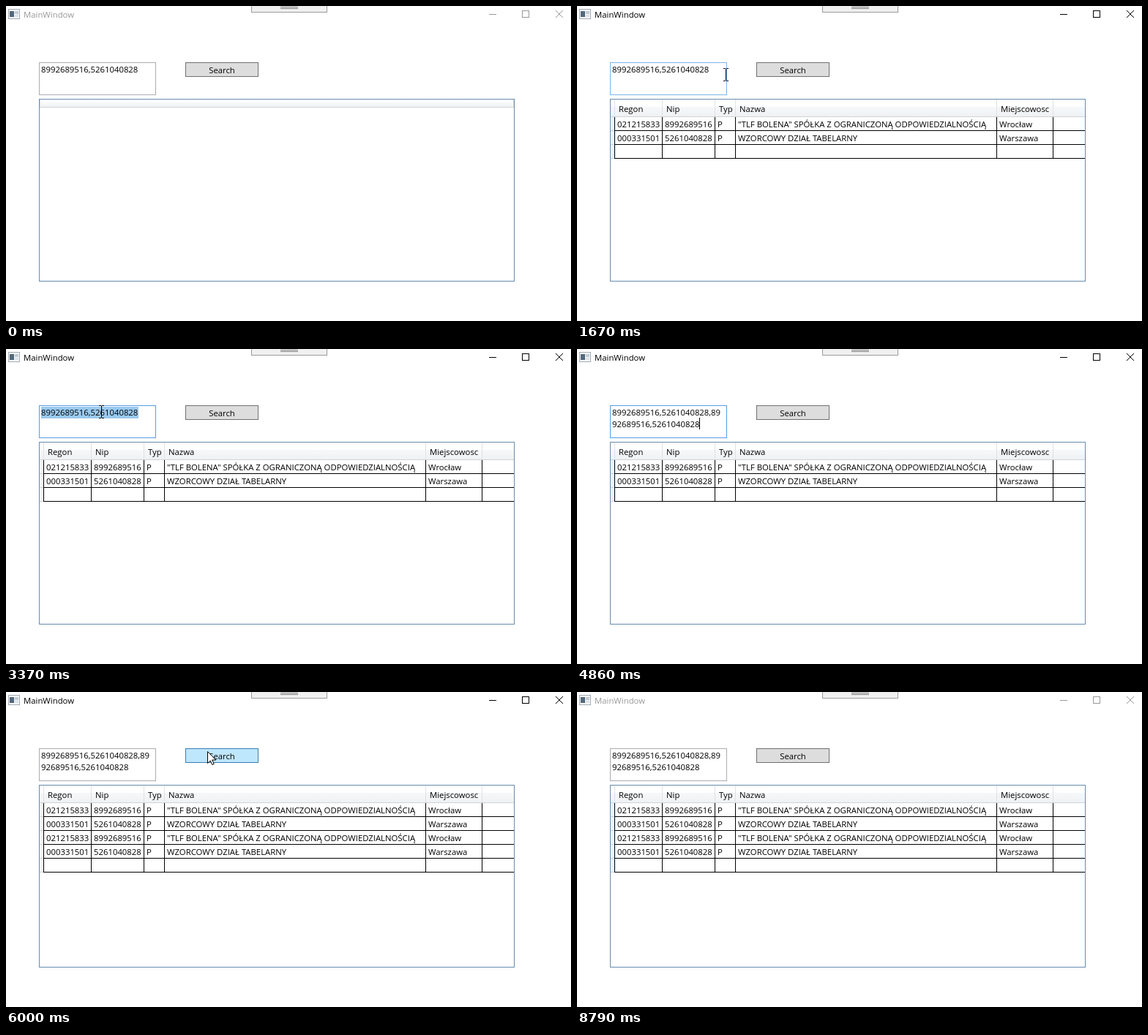
These frames come from a looping animation (772 px wide and 431 px high, 8870 ms). An HTML page:

```html
<!DOCTYPE html>
<html lang="pl">
<head>
<meta charset="utf-8">
<title>MainWindow</title>
<style>
  html, body { margin: 0; width: 100%; height: 100%; overflow: hidden; background: #fff; }
  svg { display: block; width: 100vw; height: 100vh; }
  text { font: 11.33px "Open Sans", "Noto Sans", sans-serif; white-space: pre; }
  rect, line { shape-rendering: crispEdges; }
</style>
</head>
<body>
<svg id="stage" viewBox="0 0 772 431">
  <defs>
    <linearGradient id="head" x1="0" y1="0" x2="0" y2="1">
      <stop offset="0" stop-color="#fff"/>
      <stop offset=".4" stop-color="#fff"/>
      <stop offset=".41" stop-color="#f7f8fa"/>
      <stop offset="1" stop-color="#f0f1f2"/>
    </linearGradient>
  </defs>
</svg>
<script>
const LOOP = 8870;
const stage = document.getElementById('stage');

function add(parent, tag, attrs, content) {
  const el = document.createElementNS('http://www.w3.org/2000/svg', tag);
  set(el, attrs);
  if (content) el.textContent = content;
  parent.appendChild(el);
  return el;
}
function set(el, attrs) {
  for (const k in attrs) el.setAttribute(k, attrs[k]);
}
const show = (el, on) => el.setAttribute('visibility', on ? 'visible' : 'hidden');
const group = (parent = stage) => add(parent, 'g', {});
const fill = (p, x, y, width, height, color) => add(p, 'rect', { x, y, width, height, fill: color });
const frame = (p, x, y, w, h, color, stroke) =>
  add(p, 'rect', { x: x + .5, y: y + .5, width: w - 1, height: h - 1, fill: color, stroke });
const label = (p, x, y, s) => add(p, 'text', { x, y }, s);

// Title bar
fill(stage, 0, 0, 772, 431, '#fff');
frame(stage, 3, 4, 16, 14, '#f4f6f8', '#a3abb3');
fill(stage, 5, 7, 6, 8, '#53697c');
fill(stage, 12, 7, 5, 4, '#c3ccd4');
fill(stage, 12, 12, 5, 3, '#dde2e7');
const title = label(stage, 24, 16, 'MainWindow');
const chrome = add(stage, 'g', { fill: 'none' });
add(chrome, 'line', { x1: 660, y1: 11.5, x2: 670, y2: 11.5 });
add(chrome, 'rect', { x: 705.5, y: 6.5, width: 9, height: 9 });
add(chrome, 'path', { d: 'M751 6l10 10M761 6l-10 10' });

// Docked tool tab
frame(stage, 335, -2, 104, 11, '#f0f0f0', '#9b9b9b');
fill(stage, 375, 1, 24, 1, '#808080');
fill(stage, 375, 3, 24, 1, '#808080');

// Text box
const box = frame(stage, 45, 77, 160, 45, '#fff', '#abadb3');
const selection = fill(stage, 48, 79, 0, 16, '#99c9ef');
const lines = [label(stage, 48, 91, ''), label(stage, 48, 107, '')];
const caret = fill(stage, 0, 0, 1, 16, '#000');

// Button
const button = frame(stage, 245, 77, 100, 20, '#ddd', '#707070');
set(label(stage, 295, 92, 'Search'), { 'text-anchor': 'middle' });

// Data grid
frame(stage, 45, 127, 650, 250, '#fff', '#688caf');
const emptyHead = group();
fill(emptyHead, 46, 128, 648, 11, 'url(#head)');
fill(emptyHead, 46, 138, 648, 1, '#d0d3d6');
fill(emptyHead, 46, 128, 1, 11, '#d9dbdd');
fill(emptyHead, 693, 128, 1, 11, '#d9dbdd');

const edges = [51, 116, 188, 216, 573, 650];
const names = ['Regon', 'Nip', 'Typ', 'Nazwa', 'Miejscowosc'];
const records = [
  ['021215833', '8992689516', 'P', '"TLF BOLENA" SPÓŁKA Z OGRANICZONĄ ODPOWIEDZIALNOŚCIĄ', 'Wrocław'],
  ['000331501', '5261040828', 'P', 'WZORCOWY DZIAŁ TABELARNY', 'Warszawa']
];

function makeTable(count) {
  const g = group();
  const bottom = 152 + (count + 1) * 19;
  fill(g, 46, 128, 648, 24, 'url(#head)');
  fill(g, 46, 151, 648, 1, '#d0d3d6');
  fill(g, 46, 152, 5, bottom - 152, '#f3f4f5');
  edges.forEach((x, i) => {
    fill(g, x, 128, 1, 23, '#dfe1e4');
    fill(g, x, 152, 1, bottom - 152, '#000');
    if (names[i]) label(g, x + 6, 145, names[i]);
  });
  for (let r = 0; r <= count; r++) {
    const y = 152 + r * 19;
    fill(g, 46, y + 18, 5, 1, '#d0d3d6');
    fill(g, 51, y + 18, 643, 1, '#000');
    if (r < count) records[r % 2].forEach((s, i) => label(g, edges[i] + 4, y + 14, s));
  }
  return g;
}
const shortTable = makeTable(2);
const longTable = makeTable(4);

// Pointer
const halo = add(stage, 'circle', { r: 12, fill: '#fff000', 'fill-opacity': .5 });
const arrow = add(stage, 'path', {
  d: 'M.5.5V16.5L4.2 13L6.8 18.5L9.2 17.5L6.7 12H11.8Z', fill: '#fff', stroke: '#000'
});
const beam = add(stage, 'path', {
  d: 'M-3 -8.5H0M1 -8.5H4M-3 8.5H0M1 8.5H4M.5 -8V8', fill: 'none', stroke: '#000'
});

// Bursts of motion: start, end, number of steps
const bursts = [
  [70, 520, 7], [1290, 1750, 7], [1980, 2590, 9], [2910, 3450, 8],
  [5320, 5620, 5], [6550, 7400, 12], [7470, 7780, 5]
];
// Pointer path: time, x, y
const path = [
  [70, 515, 318], [300, 366, 150], [520, 307, 89], [1290, 307, 89], [1750, 182, 95],
  [1980, 184, 94], [2355, 196, 86], [2400, 196, 86], [2500, 194, 84], [2900, 193, 88],
  [3140, -8, 90], [3220, -8, 90], [3450, 199, 84], [5320, 199, 93], [5440, 225, 98],
  [5620, 275, 81], [6500, 275, 81], [6700, 470, 260], [6860, 645, 398], [7020, 752, 160],
  [7095, 750, 1], [7165, 726, 25], [7400, 727, 300], [7470, 732, 318], [7770, 775, 434]
];

function stepTime(t) {
  let held = t;
  for (const [a, b, n] of bursts) {
    if (t < a) break;
    const step = (b - a) / (n - 1);
    held = a + Math.min(n - 1, Math.floor((t - a + 6) / step)) * step;
  }
  return held;
}

function pointerAt(t) {
  const s = stepTime(t);
  const i = path.findIndex(p => p[0] > s);
  if (i < 0) return path[path.length - 1].slice(1);
  if (i === 0) return path[0].slice(1);
  const [a, x, y] = path[i - 1], [b, x2, y2] = path[i];
  const k = (s - a) / (b - a);
  return [Math.round(x + (x2 - x) * k), Math.round(y + (y2 - y) * k)];
}

function draw(t) {
  const within = (a, b) => t >= a && t < b;
  const [x, y] = pointerAt(t);
  const visible = within(70, 4470) || within(5320, 7780);
  const over = (l, top, w, h) => visible && x >= l && x < l + w && y >= top && y < top + h;

  const ink = within(1210, 8790) ? '#000' : '#999';
  set(title, { fill: ink });
  set(chrome, { stroke: ink });

  // Editing
  const first = '8992689516,5261040828';
  const pasted = t >= 4860;
  lines[0].textContent = first + (pasted ? ',89' : t >= 4470 ? ',' : '');
  lines[1].textContent = pasted ? '92689516,5261040828' : '';
  const focused = within(150, 670) || within(2510, 5770);
  const inBox = over(45, 77, 160, 45);
  set(box, { stroke: focused ? '#569de5' : inBox ? '#7eb4ea' : '#abadb3' });

  const selecting = within(2910, 3600);
  const left = t >= 3140 ? 48 : Math.max(48, Math.min(181, x));
  set(selection, { x: left, width: 181 - left });
  show(selection, selecting);

  const reset = [2510, 3600, 4470, 4860].filter(v => v <= t).pop();
  const blinkOn = reset && (t - reset) % 1000 < (reset === 4860 ? 460 : 540);
  show(caret, blinkOn && !selecting && t < 5770 && !within(5320, 5770));
  const row = pasted ? 1 : 0;
  set(caret, { x: 48 + Math.round(lines[row].getComputedTextLength()), y: 78 + row * 16 });

  // Button
  const pressed = within(670, 1210) || within(5770, 6000);
  const hover = over(245, 77, 100, 20);
  set(button, {
    fill: pressed ? '#c4e5f6' : hover ? '#bee6fd' : '#ddd',
    stroke: pressed ? '#2c628b' : hover ? '#3c7fb1' : '#707070'
  });

  show(emptyHead, t < 1290);
  show(shortTable, within(1290, 6000));
  show(longTable, t >= 6000);

  // Pointer
  const clicking = within(670, 1290) || within(2510, 2590) || within(2910, 3220) ||
    within(3600, 3680) || within(5770, 5850);
  const dragging = within(2910, 3450);
  set(halo, { cx: x + .5, cy: y });
  show(halo, clicking);
  set(arrow, { transform: `translate(${x} ${y})` });
  set(beam, { transform: `translate(${x} ${y})` });
  show(arrow, visible && !inBox && !dragging);
  show(beam, visible && (inBox || dragging));
}

const begin = performance.now();
function tick() {
  draw((performance.now() - begin) % LOOP);
  requestAnimationFrame(tick);
}
draw(0);
requestAnimationFrame(tick);
</script>
</body>
</html>
```
